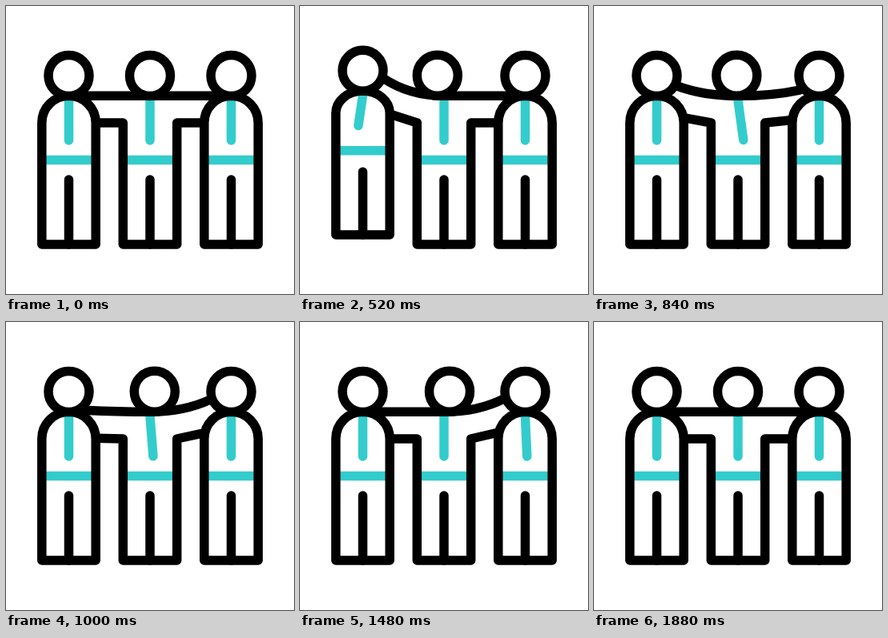
An HTML page with a canvas for the animation above (2 s loop, 360 px wide and 360 px high).

```html
<!DOCTYPE html>
<html lang="en">
<head>
<meta charset="utf-8">
<title>Three friends</title>
<style>
html, body { margin: 0; width: 100%; height: 100%; overflow: hidden; background: #fff; }
canvas { display: block; }
</style>
</head>
<body>
<canvas id="stage" width="360" height="360"></canvas>
<script>
const ctx = document.getElementById('stage').getContext('2d');
const LOOP = 2000, STEP = 40;
const INK = '#000', TEAL = '#33cccc';
const HEAD_Y = 87, SHOULDER = 112.3, ARMPIT = 146, FLOOR = 298, HALF = 33.7;

const part = (t, a, b) => Math.min(1, Math.max(0, (t - a) / (b - a)));
const ease = (t, a, b) => (1 - Math.cos(Math.PI * part(t, a, b))) / 2;
const bump = (t, a, b) => Math.sin(Math.PI * part(t, a, b));

// Eased value through a list of [time, value] points, starting at zero.
function track(t, ...points) {
  let value = 0, from = 0;
  for (const [time, to] of points) {
    value += (to - value) * ease(t, from, time);
    from = time;
  }
  return value;
}

function stroke(path, color = INK, cap = 'round') {
  ctx.strokeStyle = color;
  ctx.lineCap = cap;
  ctx.stroke(new Path2D(path));
}

function head(x, y) {
  ctx.beginPath();
  ctx.arc(x, y, 25.5, 0, 2 * Math.PI);
  ctx.fillStyle = '#fff';
  ctx.fill();
  ctx.strokeStyle = INK;
  ctx.stroke();
}

function tie(x, dy, length, degrees) {
  ctx.save();
  ctx.translate(x, 118 + dy);
  ctx.rotate(degrees * Math.PI / 180);
  stroke(`M0 0V${length}`, TEAL);
  ctx.restore();
}

const belt = (x, dy) => stroke(`M${x - 28.5} ${192.5 + dy}h57`, TEAL, 'butt');
const legs = (x, dy, floor) => stroke(`M${x} ${217 + dy}V${floor}`);

function friend(x, t, side) {
  const lift = track(t, [130, -13.5], [270, 0]);
  const neck = track(t, [130, -7], [270, 0]);
  const floor = FLOOR + lift, arm = ARMPIT + lift, arch = HALF + lift - neck;
  const body = `M${x - HALF} ${floor}V${arm}a${HALF} ${arch} 0 0 1 ${2 * HALF} 0V${floor}Z`;
  ctx.fillStyle = '#fff';
  ctx.fill(new Path2D(body));
  tie(x, neck, track(t, [130, -13], [280, 0]) + 50, side * 9.3 * bump(t, 0, 440));
  belt(x, track(t, [140, -12.3], [310, 7], [400, 0]));
  legs(x, track(t, [140, -10.5], [310, 10], [400, 0]), floor);
  stroke(body);
  head(x, HEAD_Y + neck);
}

function middle(left, right, sway) {
  const x = 180;
  tie(x, 0, 50, sway);
  belt(x, 0);
  legs(x, 0, FLOOR);
  stroke(`M${102 + 2 * left} ${SHOULDER - 22 * left}Q137 ${SHOULDER} ${x} ${SHOULDER}` +
    `Q223 ${SHOULDER} ${258 - 2 * right} ${SHOULDER - 17 * right}`);
  stroke(`M112 ${ARMPIT - 11 * left}L${x - HALF} ${ARMPIT}V${FLOOR}h${2 * HALF}V${ARMPIT}` +
    `L248 ${ARMPIT - 8 * right}`);
  head(x + 7 * right - 8.2 * left, HEAD_Y - 0.2 * (left + right));
}

function draw(now) {
  const t = Math.floor(now % LOOP / STEP) * STEP;
  const reach = ease(t, 40, 360), swap = ease(t, 640, 1080), back = ease(t, 1520, 1880);
  const sway = 8 * (bump(t, 40, 360) - bump(t, 660, 1080) + bump(t, 1520, 1880));
  ctx.clearRect(0, 0, 360, 360);
  ctx.lineWidth = 11.5;
  ctx.lineJoin = 'round';
  middle(reach - swap, swap - back, sway);
  friend(78.5, t - 360, 1);
  friend(281.5, t - 1080, -1);
}

const start = performance.now();
function tick() {
  draw(performance.now() - start);
  requestAnimationFrame(tick);
}
tick();
</script>
</body>
</html>
```
